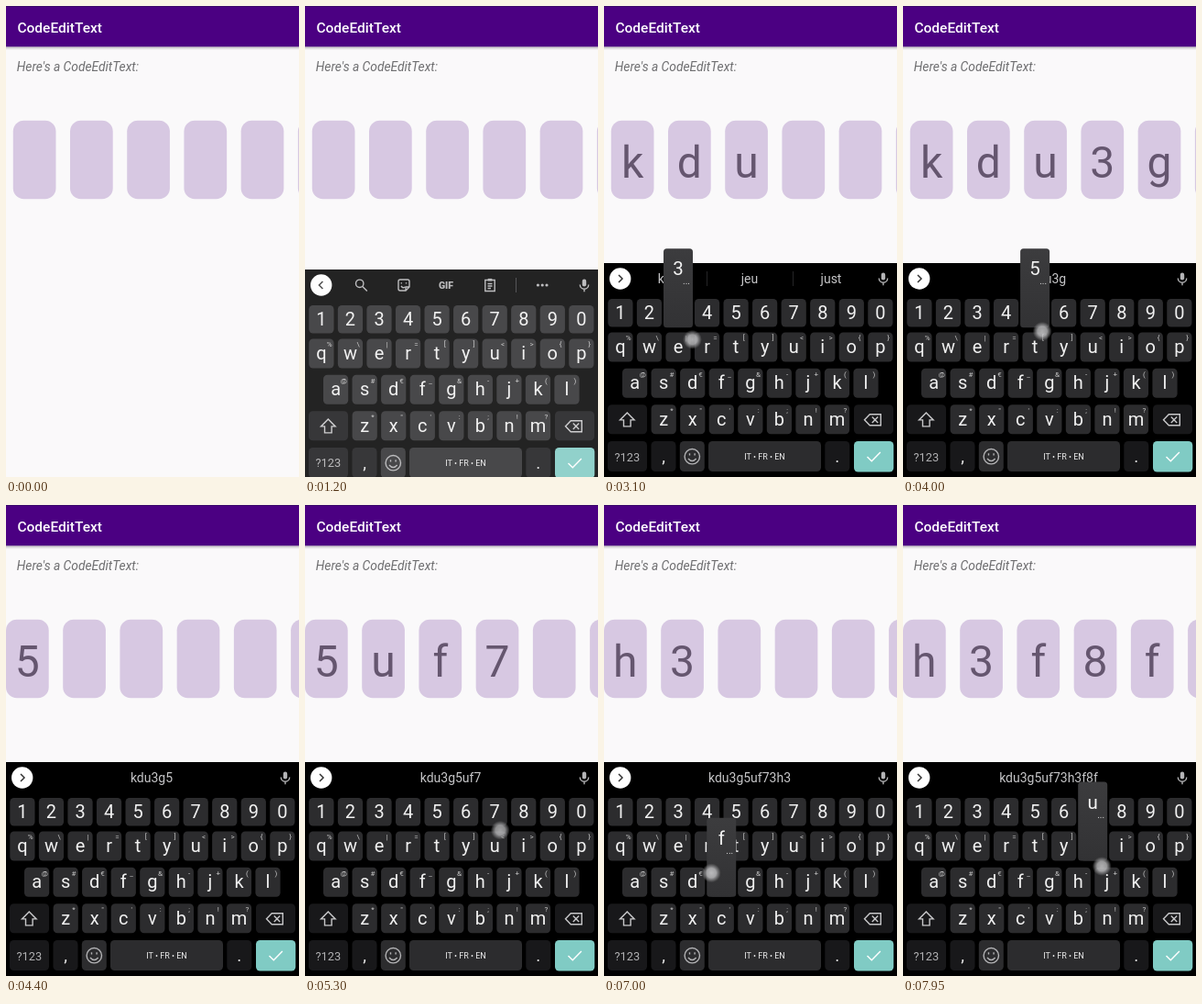
An HTML page for the animation above (8 s loop, 320 px wide and 513 px high).

```html
<!DOCTYPE html>
<html lang="en">
<head>
<meta charset="utf-8">
<title>CodeEditText</title>
<style>
  html, body { margin: 0; width: 100%; height: 100%; overflow: hidden; background: #faf9fa; }
  svg { display: block; width: 100vw; height: 100vh; font-family: Roboto, sans-serif; }
  text { white-space: pre; }
  .mid { text-anchor: middle; }
</style>
</head>
<body>
<svg id="stage" viewBox="0 0 320 513">
  <defs>
    <linearGradient id="shade" x2="0" y2="1">
      <stop stop-color="#b9b6bc"/><stop offset="1" stop-color="#faf9fa"/>
    </linearGradient>
    <linearGradient id="pop" x2="0" y2="1">
      <stop stop-color="#3c3c3e"/><stop offset="1" stop-color="#323234"/>
    </linearGradient>
    <radialGradient id="touch">
      <stop stop-color="#e0e0e2"/><stop offset=".5" stop-color="#c4c4c6"/>
      <stop offset=".75" stop-color="#8c8c8e" stop-opacity=".75"/>
      <stop offset="1" stop-color="#777" stop-opacity="0"/>
    </radialGradient>
  </defs>
  <rect width="320" height="513" fill="#faf9fa"/>
  <g id="cells"></g>
  <rect y="44" width="320" height="4" fill="url(#shade)"/>
  <rect width="320" height="44.3" fill="#4b0082"/>
  <rect width="320" height="1" fill="#39066a"/>
  <text x="12.4" y="28.7" font-size="15.5" font-weight="500" fill="#fff">CodeEditText</text>
  <text x="11.8" y="71.2" font-size="13.8" font-style="italic" fill="#6f6f71">Here's a CodeEditText:</text>
  <g id="board">
    <rect y="280" width="320" height="290"/>
    <g id="keys"></g>
    <circle cx="17.7" cy="297" r="11.7" fill="#fff"/>
    <path id="chevron" fill="none" stroke="#333" stroke-width="1.5"/>
    <g fill="none" stroke="#b4b4b6" stroke-width="1.4">
      <rect x="302.8" y="290.5" width="4.4" height="8" rx="2.2" fill="#b4b4b6" stroke="none"/>
      <path d="M300.3 296.5a4.7 4.7 0 0 0 9.4 0M305 301.2v3"/>
    </g>
    <g id="tools" fill="none" stroke="#b4b4b6" stroke-width="1.4">
      <circle cx="59.7" cy="295.3" r="4.2"/><path d="M62.8 298.4l5 5"/>
      <path d="M104 291h8q2 0 2 2v6l-4 4h-6q-2 0-2-2v-8q0-2 2-2zM114 299h-4v4M105 298q2 3 4 1"/>
      <path d="M105.3 294.2v1.4M110.5 294.2v1.4"/>
      <text class="mid" x="154" y="301" font-size="10.5" font-weight="900" fill="#b4b4b6" stroke="none">GIF</text>
      <path d="M196.8 291.5h10.4v12h-10.4zM199.5 295.5h5M199.5 298h5M199.5 300.5h3.5"/>
      <path d="M199.7 291.2h4.6" stroke-width="2.6"/>
      <path d="M230.5 289v16" stroke="#3c3c3e" stroke-width="1"/>
      <g fill="#b4b4b6" stroke="none">
        <circle cx="254.4" cy="297" r="1.6"/><circle cx="259.2" cy="297" r="1.6"/><circle cx="264" cy="297" r="1.6"/>
      </g>
    </g>
    <g id="words" font-size="14" fill="#c6c6c8">
      <path id="bars" d="M112.5 289v16M206.5 289v16" stroke="#252527"/>
      <text class="mid" x="70" y="302"></text>
      <text class="mid" x="159" y="302"></text>
      <text class="mid" x="248" y="302"></text>
    </g>
  </g>
  <g id="popup">
    <rect x="-16" y="-70" width="32" height="86" rx="3.5" fill="url(#pop)"/>
    <text class="mid" y="-41" font-size="20.5" fill="#f2f2f2"></text>
    <text class="mid" x="9" y="-31" font-size="10" fill="#e0e0e0">...</text>
  </g>
  <circle id="dot" r="10.5" fill="url(#touch)"/>
</svg>
<script>
const LOOP = 8000, PITCH = 62.22, MARGIN = 7.78;
const $ = id => document.getElementById(id);
const clamp = v => Math.max(0, Math.min(1, v));
const ease = p => p < .5 ? 4 * p ** 3 : 1 - (2 - 2 * p) ** 3 / 2;

function add(parent, tag, attrs, text) {
  const el = document.createElementNS('http://www.w3.org/2000/svg', tag);
  for (const k in attrs) el.setAttribute(k, attrs[k]);
  if (text) el.textContent = text;
  return parent.appendChild(el);
}
const label = (parent, x, y, size, fill, text) =>
  add(parent, 'text', { x, y, 'font-size': size, fill, class: 'mid' }, text);

// Code cells
const cells = Array.from({ length: 20 }, (_, i) => {
  const x = MARGIN + i * PITCH;
  add($('cells'), 'rect', { x, y: 124.7, width: 46.7, height: 85.6, rx: 11.8, fill: '#d7c8e2' });
  return label($('cells'), x + 23.3, 186.6, 48, '#65566f');
});

// Keyboard
const keys = $('keys'), spot = {};
const cap = (x, y, w, h, fill) => add(keys, 'rect', { x, y, width: w, height: h, rx: 4.5, fill });
const LIGHT = '#2c2c2e', DARK = '#18181a';
const rows = [
  ['1234567890', '', 17.9, 334.3, 30.5],
  ['qwertyuiop', '%\\|=[]<>{}', 17.9, 371.5, 32],
  ['asdfghjkl', '@#€_&-+()', 33.6, 410.8, 32],
  ['zxcvbnm', '*"\':;!?', 65.2, 450.3, 32]
];
for (const [chars, marks, x0, y, h] of rows)
  [...chars].forEach((c, i) => {
    const x = x0 + i * 31.55;
    spot[c] = [x, y];
    cap(x - 13.6, y - h / 2, 27.2, h, LIGHT);
    label(keys, x, y + 6.6, 20, '#f0f0f0', c);
    if (marks) label(keys, x + 8.8, y - 7.2, 8, '#c8c8c8', marks[i]);
  });
for (const [x, y, w, fill] of [
  [4, 434.3, 43, DARK], [273, 434.3, 43, DARK], [4, 474, 43, DARK], [51.5, 474, 27, DARK],
  [82.8, 474, 27, LIGHT], [114, 474, 123, LIGHT], [241.3, 474, 27, DARK], [273, 474, 43.3, '#80cbc4']
]) cap(x, y, w, fill === '#80cbc4' ? 33.5 : y > 470 ? 33 : 32, fill);
label(keys, 25.3, 495.5, 12.8, '#b2b2b4', '?123');
label(keys, 65, 497, 19, '#e6e6e6', ',');
label(keys, 254.8, 497, 19, '#e6e6e6', '.');
label(keys, 175.5, 494.2, 9, '#ececec', 'IT • FR • EN');
const line = (d, stroke) => add(keys, 'path', { d, stroke, fill: 'none', 'stroke-width': 1.4 });
line('M25.3 450.5l-7.8 8h4v7h7.6v-7h4z', '#c8c8ca').setAttribute('transform', 'translate(0 -7.6)');
line('M290.3 444.8h12v12h-12l-5.8-6zM292.8 447.5l6.4 6.4M299.2 447.5l-6.4 6.4', '#c8c8ca');
line('M88.1 490.7a8.2 8.2 0 1 0 16.4 0a8.2 8.2 0 1 0-16.4 0M92 493q4.3 5 8.6 0M93.5 487.2v2.2M99.1 487.2v2.2', '#b4b4b6');
line('M287.5 491l4.8 4.8l9.6-9.8', '#fff');

// key, press time, release time, finger offset
const taps = [
  ['k', 2350, 2450, 4, 10], ['d', 2620, 2710, 2, 8], ['u', 2850, 2940, 8, 16],
  ['3', 3060, 3160, 15.5, 29], ['g', 3430, 3520, 2, 12], ['5', 3960, 4050, 8, 20],
  ['u', 4710, 4800, 8, 18], ['f', 4940, 5030, -6, 4], ['7', 5180, 5270, 6, 20],
  ['3', 5610, 5700, 10, 22], ['h', 5900, 6000, -6, 21], ['3', 6660, 6750, 10, 24],
  ['f', 6960, 7050, -11, -10], ['8', 7240, 7330, 2, 20], ['f', 7550, 7640, -10, 2],
  ['u', 7910, 8010, 10, 22]
];
const hints = [['k', 'je', 'ok'], ['kd', 'le', 'de'], ['kdu', 'jeu', 'just']];
const words = $('words').querySelectorAll('text');
const popText = $('popup').querySelector('text');
const show = (el, on) => el.style.display = on ? '' : 'none';
const move = (el, x, y) => el.setAttribute('transform', `translate(${x} ${y})`);

function draw(t) {
  const code = taps.filter(k => t >= k[2]).map(k => k[0]).join('');
  cells.forEach((c, i) => c.textContent = code[i] || '');

  // The row jumps five cells on whenever a group is full
  const first = ease(clamp((t - 4070) / 300)), next = ease(clamp((t - 6004) / 300));
  move($('cells'), -(first * (MARGIN + 5 * PITCH) + next * 5 * PITCH), 0);

  const rise = 1 - (1 - clamp((t - 1100) / 210)) ** 3;
  show($('board'), rise > 0);
  $('board').setAttribute('opacity', rise);
  move($('board'), 0, 50 * (1 - rise));

  show($('tools'), !code);
  show($('words'), code);
  show($('bars'), code.length < 4);
  $('chevron').setAttribute('d', code ? 'M16 293l4 4l-4 4' : 'M19.4 293l-4 4l4 4');
  const list = hints[code.length - 1] || ['', code, ''];
  words.forEach((w, i) => w.textContent = list[i]);

  const tap = taps.filter(k => t >= k[1]).pop();
  show($('popup'), tap && t < tap[2] + 30);
  show($('dot'), tap && t < tap[2] + 200);
  if (!tap) return;
  const [c, down, up, dx, dy] = tap, [x, y] = spot[c];
  popText.textContent = c;
  move($('popup'), x, y);
  move($('dot'), x + dx, y + dy);
  $('dot').setAttribute('opacity', t < up ? clamp(.4 + (t - down) / 80) * .85 : .85 * (1 - clamp((t - up) / 200)));
}

const start = performance.now();
function tick() {
  draw((performance.now() - start) % LOOP);
  requestAnimationFrame(tick);
}
tick();
</script>
</body>
</html>
```
